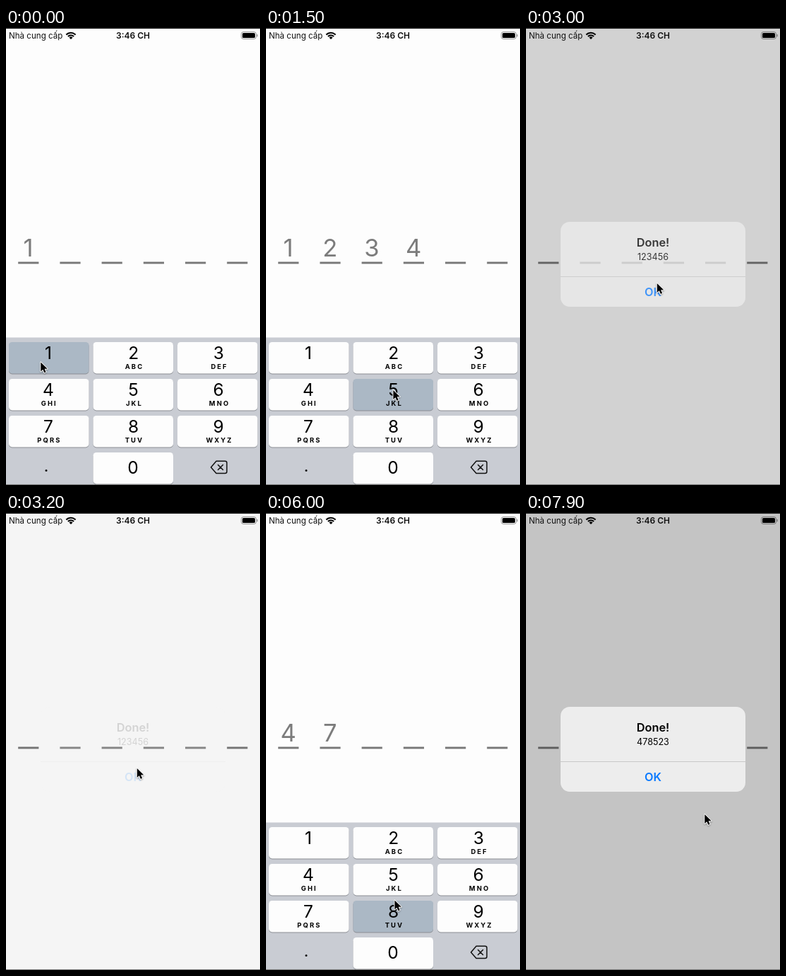
Animation, 360 px wide and 646 px high, one loop 8 s. Source, as an HTML page with a canvas:

```html
<!DOCTYPE html>
<html lang="vi">
<head>
<meta charset="utf-8">
<style>
html, body { margin: 0; width: 100%; height: 100%; overflow: hidden; background: #fdfdfd; }
canvas { display: block; width: 360px; height: 646px; }
</style>
</head>
<body>
<canvas id="stage"></canvas>
<script>
const W = 360, H = 646, LOOP = 8000;
const FONT = 'Inter, "Open Sans", sans-serif';
const canvas = document.getElementById('stage');
const ctx = canvas.getContext('2d');
const ratio = window.devicePixelRatio || 1;
canvas.width = W * ratio;
canvas.height = H * ratio;

const LETTERS = ' ABC DEF GHI JKL MNO PQRS TUV WXYZ'.split(' ');
const HOLD = 190, ECHO = 100, KEYBOARD_UP = 3860;

// A code typed at an even pace, then an alert; aim is where the pointer hits each key,
// and rests are [arrive, leave, x, y] stops after typing.
const ROUNDS = [
  {
    code: '123456', first: -100, pace: 388, aim: [-1, 15], alert: 1910, close: 2950,
    rests: [[2060, 2250, 259.5, 513], [2780, 3280, 185, 360], [3780, 4640, 28.5, 322.5]]
  },
  {
    code: '478523', first: 5090, pace: 424, aim: [1, -1.5], alert: 7310, close: Infinity,
    rests: [[7900, LOOP, 252.5, 425]]
  }
];

const clamp = v => Math.max(0, Math.min(1, v));
const easeOut = v => 1 - (1 - clamp(v)) ** 2;
const smooth = v => v * v * (3 - 2 * v);
const mix = (a, b, k) => a + (b - a) * k;

const keyX = col => 4 + col * 119.5;
const keyY = row => 444 + row * 52;
const labelX = col => 60 + col * 120.6;
const keyCell = n => [(n - 1) % 3, Math.floor((n - 1) / 3)];
const pressTime = (round, i) => round.first + i * round.pace;

function buildStops() {
  const stops = [[0, 90, 48.5, 471.5]];
  for (const round of ROUNDS) {
    [...round.code].forEach((n, i) => {
      const t = pressTime(round, i);
      if (t < 0) return;
      const [col, row] = keyCell(n);
      stops.push([t - 30, t + 110, labelX(col) + round.aim[0], keyY(row) + round.aim[1]]);
    });
    stops.push(...round.rests);
  }
  return stops;
}
const stops = buildStops();

function pointerAt(t) {
  const i = Math.max(1, stops.findIndex(s => s[1] >= t));
  const [, left, x0, y0] = stops[i - 1], [arrive, , x1, y1] = stops[i];
  const k = smooth(clamp((t - left) / (arrive - left)));
  return [mix(x0, x1, k), mix(y0, y1, k)];
}

function text(str, x, y, size, weight, color, align = 'center', spacing = 0) {
  ctx.font = `${weight} ${size}px ${FONT}`;
  ctx.textAlign = align;
  ctx.letterSpacing = spacing + 'px';
  ctx.fillStyle = color;
  ctx.fillText(str, x + spacing / 2, y);
  ctx.letterSpacing = '0px';
}

function rect(x, y, w, h, color) {
  ctx.fillStyle = color;
  ctx.fillRect(x, y, w, h);
}

function box(x, y, w, h, r, color) {
  ctx.fillStyle = color;
  ctx.beginPath();
  ctx.roundRect(x, y, w, h, r);
  ctx.fill();
}

function drawStatus() {
  text('Nhà cung cấp', 4, 15, 11.6, 400, '#111', 'left');
  text('3:46 CH', 180, 15, 12, 600, '#111');

  // Wi-Fi
  const from = -Math.PI * 0.76, to = -Math.PI * 0.24;
  ctx.strokeStyle = ctx.fillStyle = '#000';
  ctx.lineWidth = 2.1;
  for (const r of [5.6, 9.1]) {
    ctx.beginPath();
    ctx.arc(92, 15.8, r, from, to);
    ctx.stroke();
  }
  ctx.beginPath();
  ctx.moveTo(92, 16);
  ctx.arc(92, 15.8, 3.4, from, to);
  ctx.fill();

  // Battery
  const rim = 'rgba(0,0,0,.4)';
  ctx.strokeStyle = rim;
  ctx.lineWidth = 1;
  ctx.beginPath();
  ctx.roundRect(333.5, 5.5, 21, 10, 3);
  ctx.stroke();
  box(335, 7, 18, 7, 1.6, '#000');
  box(355.6, 8.8, 1.3, 3.6, 0.7, rim);
}

function drawSlots(digits) {
  for (let i = 0; i < 6; i++) {
    const x = 17.2 + i * 59.2;
    rect(x, 330.5, 29.2, 2.9, '#787878');
    if (digits[i]) text(digits[i], x + 14.4, 323, 34.5, 400, '#7c7c7c');
  }
}

function drawKey(col, row, pressed) {
  const x = keyX(col), y = keyY(row);
  box(x, y + 1, 113.5, 44.4, 4.6, '#8b8e94');
  box(x, y, 113.5, 44.4, 4.6, pressed ? '#abb8c5' : '#fdfdfd');
}

function drawDelete() {
  ctx.strokeStyle = '#111';
  ctx.lineWidth = 1.5;
  ctx.lineJoin = ctx.lineCap = 'round';
  ctx.beginPath();
  ctx.moveTo(290.5, 621);
  ctx.lineTo(298, 612.3);
  ctx.arcTo(313, 612.3, 313, 621, 2.5);
  ctx.arcTo(313, 629.5, 298, 629.5, 2.5);
  ctx.lineTo(298, 629.5);
  ctx.closePath();
  for (const d of [-3.5, 3.5]) {
    ctx.moveTo(304 - d, 617.5);
    ctx.lineTo(304 + d, 624.5);
  }
  ctx.stroke();
}

function drawKeyboard(shown, pressed) {
  if (shown <= 0) return;
  ctx.save();
  ctx.translate(0, (1 - shown) * 209);
  rect(0, 437.5, W, 210, '#c9ccd3');
  LETTERS.forEach((letters, i) => {
    const n = String(i + 1), [col, row] = keyCell(n), x = labelX(col), y = keyY(row);
    drawKey(col, row, pressed === n);
    text(n, x, y + 24, 24.5, 400, '#000');
    text(letters, x + 0.3, y + 37.8, 9.4, 700, '#000', 'center', 2.1);
  });
  drawKey(1, 3, false);
  text('0', 180, 630, 24.5, 400, '#000');
  box(55.5, 624, 3, 3, 1.5, '#111');
  drawDelete();
  ctx.restore();
}

function drawAlert(alpha, scale, code) {
  if (alpha <= 0) return;
  ctx.save();
  ctx.globalAlpha = alpha;
  ctx.translate(180, 334);
  ctx.scale(scale, scale);
  ctx.translate(-180, -334);
  box(49, 274, 262, 120, 13, '#ededed');
  rect(49, 351, 262, 0.9, '#c4c4c4');
  text('Done!', 180, 308.8, 16.3, 600, '#000');
  text(code, 180, 328, 12.6, 400, '#000');
  text('OK', 180, 379, 16.3, 600, '#0a7aff');
  ctx.restore();
}

function drawPointer(x, y) {
  const arrow = new Path2D('M0 0V14.6L3.4 11.5 5.6 16.7 8.2 15.6 6 10.5H10.6Z');
  ctx.save();
  ctx.translate(x + 0.8, y + 1);
  ctx.scale(0.89, 0.89);
  ctx.lineJoin = 'round';
  ctx.shadowColor = 'rgba(0,0,0,.35)';
  ctx.shadowBlur = 2 * ratio;
  ctx.shadowOffsetY = ratio;
  ctx.strokeStyle = '#fff';
  ctx.lineWidth = 2.2;
  ctx.stroke(arrow);
  ctx.shadowColor = 'transparent';
  ctx.fillStyle = '#000';
  ctx.fill(arrow);
  ctx.restore();
}

function render(t) {
  const first = t < KEYBOARD_UP;
  const round = ROUNDS[first ? 0 : 1];
  const open = easeOut((t - round.alert) / 460);
  const level = open * (1 - easeOut((t - round.close) / 400));
  const rise = first ? 1 : easeOut((t - KEYBOARD_UP) / 380);
  const fall = easeOut((t - round.alert) / 185);

  let digits = '', pressed = '';
  if (t < round.alert) {
    [...round.code].forEach((n, i) => {
      const age = t - pressTime(round, i);
      if (age >= ECHO) digits += n;
      if (age >= 0 && age < HOLD) pressed = n;
    });
  }

  ctx.setTransform(ratio, 0, 0, ratio, 0, 0);
  rect(0, 0, W, H, '#fdfdfd');
  drawSlots(digits);
  rect(0, 0, W, H, `rgba(0,0,0,${0.226 * level})`);
  drawStatus();
  drawKeyboard(rise * (1 - fall), pressed);
  drawAlert(level, 1 + 0.2 * (1 - open), round.code);
  rect(0, 0, W, 1, '#1c1c1c');
  rect(0, H - 1, W, 1, '#777');
  drawPointer(...pointerAt(t));
}

const begin = performance.now();
function tick(now) {
  render(Math.max(0, now - begin) % LOOP);
  requestAnimationFrame(tick);
}
render(0);
requestAnimationFrame(tick);
</script>
</body>
</html>
```
